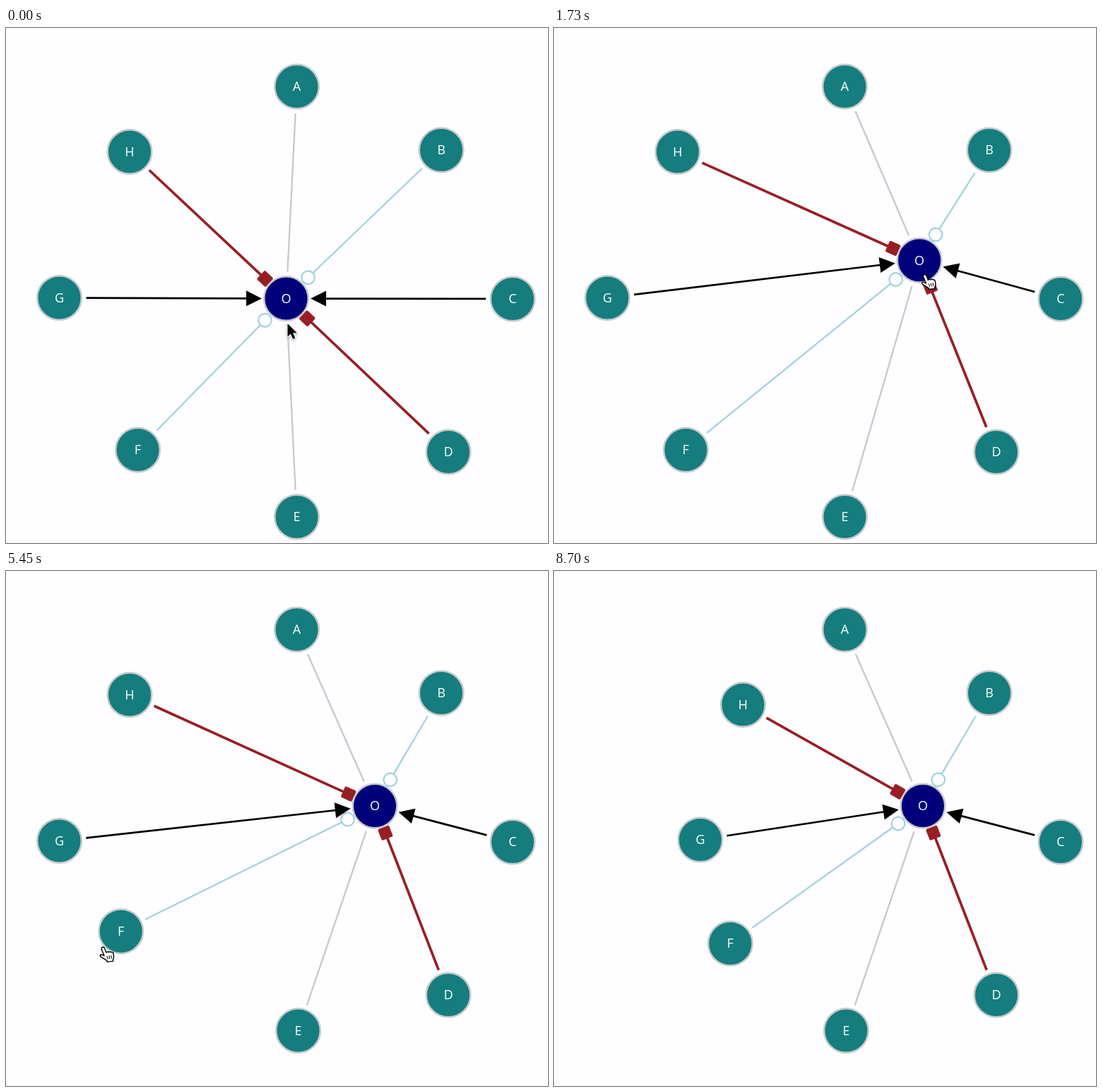
An HTML page with a canvas that plays this animation: 767x730 px, repeating every 9610 ms.

```html
<!DOCTYPE html>
<html lang="en">
<head>
<meta charset="utf-8">
<title>Node graph</title>
<style>
  html, body { margin: 0; width: 100%; height: 100%; overflow: hidden; background: #fefdff; }
  canvas { display: block; width: 767px; height: 730px; }
</style>
</head>
<body>
<canvas id="stage"></canvas>
<script>
const W = 767, H = 730, LOOP = 9610, MOVE = 400;
const TEAL = '#157d7e', NAVY = '#00007a', RING = '#c9cacc', BACK = '#fefdff';

const canvas = document.getElementById('stage');
const ctx = canvas.getContext('2d');
const dpr = window.devicePixelRatio || 1;
canvas.width = W * dpr;
canvas.height = H * dpr;

const home = {
  A: [411.5, 83], B: [616, 173], C: [717, 384], D: [626, 601], E: [411.5, 693],
  F: [186.5, 598], G: [75.5, 382.5], H: [175, 175.5], O: [396.5, 383.5]
};

// Where the pointer holds each node, relative to its centre
const grip = { O: [7, 21], E: [-11, -12], F: [-26, 23], G: [-15, 13], H: [-20, 9] };

// Each drag glides to a place; with radii it also swings round an ellipse,
// beginning at the given angle. Without an id the pointer just rests there.
const drags = [
  { start: 0, end: 30, to: [398.5, 419] },
  { id: 'O', start: 190, end: 330, to: [400, 650] },
  { id: 'O', start: 330, end: 1200, to: [411, 688], radii: [308, 268], angle: 90 },
  { id: 'O', start: 1200, end: 1420, to: [502.5, 318] },
  { id: 'O', start: 1420, end: 1900, to: [522, 333] },
  { id: 'E', start: 2610, end: 3880, to: [413.5, 651.5], radii: [210, 235], angle: 90, turns: 2 },
  { start: 4300, end: 4700, to: [144, 626] },
  { id: 'F', start: 4970, end: 5560, to: [249.5, 528], radii: [255, 80], angle: 118 },
  { id: 'G', start: 5910, end: 6270, to: [207, 381], radii: [237, 100], angle: 180 },
  { id: 'H', start: 6850, end: 7420, to: [259.5, 177], radii: [230, 108], angle: 230 },
  { id: 'H', start: 7420, end: 8250, to: [267.5, 189.5], radii: [252, 270], angle: 222 },
  { start: 8700, end: LOOP, to: [650, -30] }
];

const STYLES = {
  line: { color: '#c8c8cb', width: 2.3, gap: 38 },
  ring: { color: '#a3d0df', width: 2.2, gap: 52 },
  arrow: { color: '#000', width: 2.7, gap: 50 },
  square: { color: '#971f24', width: 3.7, gap: 44 }
};
const KINDS = Object.keys(STYLES);

const add = (a, b) => [a[0] + b[0], a[1] + b[1]];
const mix = (a, b, s) => [a[0] + (b[0] - a[0]) * s, a[1] + (b[1] - a[1]) * s];
const clamp = u => Math.min(1, Math.max(0, u));
const ease = u => u - Math.sin(2 * Math.PI * u) / (2 * Math.PI) * 0.8;

function swing(drag, from, t) {
  const { start, end, to, radii = [0, 0], angle = 0, turns = 1 } = drag;
  const s = ease(clamp((t - start) / (end - start)));
  const a = angle * Math.PI / 180, b = a - 2 * Math.PI * turns * s;
  return add(mix(from, to, s), [
    radii[0] * (Math.cos(b) - Math.cos(a)),
    radii[1] * (Math.sin(b) - Math.sin(a))
  ]);
}

function poseAt(t) {
  const nodes = { ...home };
  let tip = drags[0].to, freeSince = 0;
  for (const drag of drags) {
    const { id, start, end, to } = drag;
    const hold = () => id ? add(nodes[id], grip[id]) : to;
    if (t < start) {
      const leave = Math.max(freeSince, start - MOVE);
      tip = mix(tip, hold(), ease(clamp((t - leave) / (start - leave))));
      break;
    }
    if (id) nodes[id] = swing(drag, nodes[id], t);
    tip = hold();
    freeSince = end;
    if (t < end) break;
  }
  return { nodes, tip };
}

// Drawn along the x axis with the far end at the hub
function drawLink(from, to, kind) {
  const { color, width, gap } = STYLES[kind];
  const dx = to[0] - from[0], dy = to[1] - from[1], len = Math.hypot(dx, dy);
  if (len < 60) return;
  ctx.save();
  ctx.translate(from[0], from[1]);
  ctx.rotate(Math.atan2(dy, dx));
  ctx.strokeStyle = ctx.fillStyle = color;
  ctx.lineWidth = width;
  if (len - gap > 38) {
    ctx.beginPath();
    ctx.moveTo(38, 0);
    ctx.lineTo(len - gap, 0);
    ctx.stroke();
  }
  ctx.translate(len, 0);
  ctx.beginPath();
  if (kind === 'arrow') {
    ctx.moveTo(-34.5, 0);
    ctx.lineTo(-56.5, -11);
    ctx.lineTo(-56.5, 11);
    ctx.fill();
  } else if (kind === 'square') {
    ctx.lineJoin = 'round';
    ctx.lineWidth = 4;
    ctx.rect(-47.5, -6.5, 13, 13);
    ctx.fill();
    ctx.stroke();
  } else if (kind === 'ring') {
    ctx.arc(-43, 0, 9.3, 0, 7);
    ctx.fillStyle = BACK;
    ctx.fill();
    ctx.stroke();
  }
  ctx.restore();
}

function drawNode(id, [x, y]) {
  ctx.beginPath();
  ctx.arc(x, y, 31.3, 0, 7);
  ctx.fillStyle = id === 'O' ? NAVY : TEAL;
  ctx.fill();
  ctx.strokeStyle = RING;
  ctx.lineWidth = 2.5;
  ctx.stroke();
  ctx.fillStyle = '#fff';
  ctx.fillText(id, x, y + 6.3);
}

const arrowShape = new Path2D('M0 0V18.5L4.3 14.5L7.6 22L10.8 20.6L7.6 13.3H13.3Z');
const handShape = new Path2D(
  'M-2 2Q-1.5-1 1-.8Q2.4-.4 3 2L4.7 8Q7 5.8 8.4 8Q10.6 6.4 11.8 8.7' +
  'Q14.4 7.6 14.8 10.6L15 15.5Q14.6 18 13.2 19.5V22H4.2V20.2' +
  'L-4.6 13Q-6 10.2-3.4 9.8L1 12.4Z');
const handLines = new Path2D('M5.2 13.2L5.8 18M8.2 13L8.6 18M11.2 12.8L11.4 17.8');

function drawPointer([x, y], isHand) {
  ctx.save();
  ctx.translate(x, y);
  ctx.lineJoin = 'round';
  if (isHand) {
    ctx.rotate(-0.12);
    ctx.scale(0.95, 0.95);
    ctx.fillStyle = '#fff';
    ctx.strokeStyle = '#000';
    ctx.lineWidth = 1.5;
    ctx.fill(handShape);
    ctx.stroke(handShape);
    ctx.lineWidth = 1.1;
    ctx.stroke(handLines);
  } else {
    ctx.shadowColor = 'rgba(0,0,0,.35)';
    ctx.shadowBlur = 3 * dpr;
    ctx.shadowOffsetY = dpr;
    ctx.strokeStyle = '#fff';
    ctx.lineWidth = 2.4;
    ctx.stroke(arrowShape);
    ctx.shadowColor = 'transparent';
    ctx.fillStyle = '#000';
    ctx.fill(arrowShape);
  }
  ctx.restore();
}

function draw(t) {
  const { nodes, tip } = poseAt(t);
  ctx.setTransform(dpr, 0, 0, dpr, 0, 0);
  ctx.fillStyle = BACK;
  ctx.fillRect(0, 0, W, H);
  ctx.font = '500 18px "Open Sans", "Noto Sans", sans-serif';
  ctx.textAlign = 'center';

  [...'ABCDEFGH'].forEach((id, i) => drawLink(nodes[id], nodes.O, KINDS[i % 4]));
  for (const id in nodes) drawNode(id, nodes[id]);

  const over = Object.values(nodes).some(n => Math.hypot(tip[0] - n[0], tip[1] - n[1]) < 35);
  drawPointer(tip, over);
}

const begin = performance.now();
function tick() {
  draw((performance.now() - begin) % LOOP);
  requestAnimationFrame(tick);
}
tick();
</script>
</body>
</html>
```
